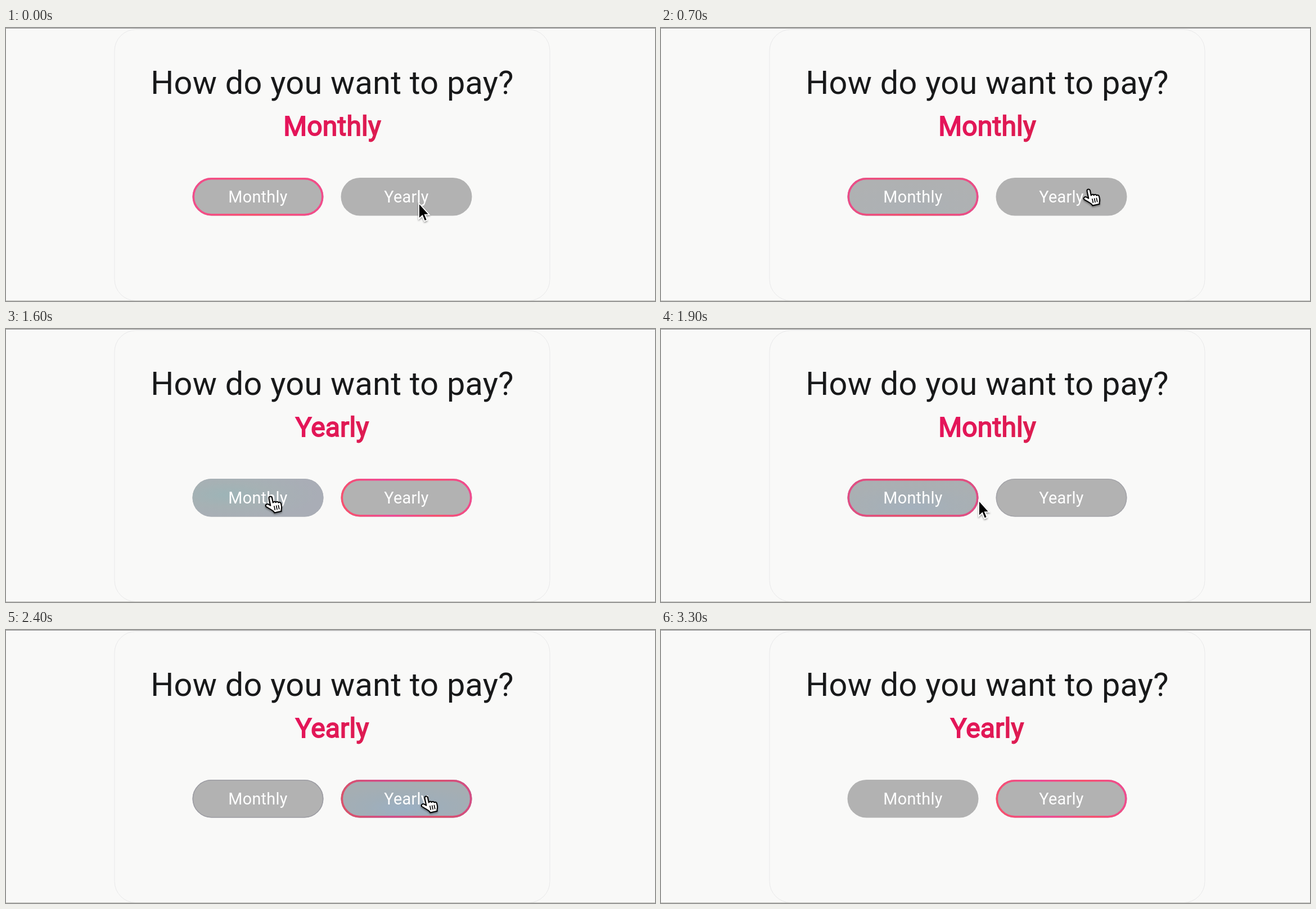
Animation of 1154x485 px, one loop 3.4 s. Source, as an HTML page:

```html
<!DOCTYPE html>
<html lang="en">
<head>
<meta charset="utf-8">
<title>Payment choice</title>
<style>
  html, body { margin: 0; width: 100%; height: 100%; overflow: hidden; background: #f9f9f8; }
  svg { display: block; width: 100vw; height: 100vh; }
  text { font-family: Roboto, sans-serif; text-anchor: middle; }
  .title { font-size: 57.6px; letter-spacing: .26px; fill: #18191a; }
  .choice { font-size: 48px; letter-spacing: .2px; fill: url(#ink); stroke: url(#ink); stroke-width: 1.8; }
  .label { font-size: 28.8px; letter-spacing: .3px; fill: #fff; }
</style>
</head>
<body>
<svg viewBox="0 0 1154 485">
  <defs>
    <linearGradient id="ink" gradientUnits="userSpaceOnUse" x1="490" y1="150" x2="670" y2="200">
      <stop stop-color="#e6135b"/><stop offset="1" stop-color="#dc1d50"/>
    </linearGradient>
    <linearGradient id="ring0" gradientUnits="userSpaceOnUse" spreadMethod="reflect" x1="332" y1="290" x2="444" y2="310">
      <stop stop-color="#f24c8c"/><stop offset="1" stop-color="#fa5070"/>
    </linearGradient>
    <linearGradient id="ring1" gradientUnits="userSpaceOnUse" spreadMethod="reflect" x1="600" y1="308" x2="676" y2="288">
      <stop stop-color="#f8506f"/><stop offset="1" stop-color="#ee4a95"/>
    </linearGradient>
    <radialGradient id="press" cx=".26" cy=".42" r=".7">
      <stop stop-color="#9db4b7"/><stop offset=".45" stop-color="#a6b1b4"/><stop offset="1" stop-color="#a9adb6"/>
    </radialGradient>
    <radialGradient id="spread" cx=".5" cy=".75" r=".6">
      <stop stop-color="#9bb0c4"/><stop offset=".5" stop-color="#a0aeb8"/><stop offset="1" stop-color="#a5aeb3"/>
    </radialGradient>
    <filter id="shadow" x="-50%" y="-50%" width="200%" height="200%">
      <feDropShadow dx="0" dy="2" stdDeviation="1.5" flood-opacity=".4"/>
    </filter>
  </defs>
  <rect width="1154" height="485" fill="#f9f9f8"/>
  <rect x="193" y="2.5" width="774" height="482" rx="38" fill="none" stroke="#e9e9ea"/>
  <path d="M0 .5H1154" stroke="#929292"/>
  <path d="M0 484.5H1154" stroke="#bdbdb8"/>
  <text class="title" x="580" y="116.5">How do you want to pay?</text>
  <text class="choice" id="choice" x="580" y="190.5"></text>
  <g id="buttons"></g>
  <g id="cursor" filter="url(#shadow)">
    <path id="arrow" d="M0 0V28L6.3 22.3 10.2 32 14.8 30.2 10.9 20.6H18.6Z" fill="#000" stroke="#fff" stroke-width="1.8"/>
    <g id="hand" transform="rotate(-12)" stroke="#000" stroke-linejoin="round" stroke-linecap="round">
      <path d="M0 3C0-.8 5.4-.8 5.4 3V12C6.4 10 10 10 10.2 12.5 11.7 11 14.8 11.5 14.8 14 16.5 13 19 14 19 16.5V21C19 25 16.8 26 16.8 30H4.2C4 26-1.5 22.5-8 16.5-10 13-5.8 11.2-3.4 13L0 16Z" fill="#fff" stroke-width="2"/>
      <path d="M6.2 18.5V25M10 18.5V25M13.8 18.5V25" fill="none" stroke-width="1.6"/>
    </g>
  </g>
</svg>
<script>
const LOOP = 3400, STEP = 100, FLIP = 100;
const byId = id => document.getElementById(id);
const names = ["Monthly", "Yearly"];
const clicks = [{ at: 300, pick: 0 }, { at: 900, pick: 1 }, { at: 1600, pick: 0 }, { at: 2200, pick: 1 }];

// time, x, y of the pointer tip
const path = [
  [0, 734, 311], [100, 690, 306], [200, 570, 300], [300, 468, 298], [400, 470, 298],
  [500, 520, 295], [600, 650, 289], [700, 757, 287], [800, 768, 290], [900, 758, 292],
  [1000, 700, 293], [1100, 592, 293], [1200, 510, 296], [1300, 470, 298], [1600, 467, 298],
  [1700, 470, 299], [1800, 500, 302], [2000, 630, 307], [2100, 690, 308], [2200, 705, 306],
  [2300, 720, 302], [2400, 744, 296], [2500, 755, 308], [2700, 780, 385], [2900, 795, 470], [3000, 798, 520]
];

const buttons = names.map((name, i) => {
  const x = i ? 595.5 : 331.5;
  const pill = (inset, attrs) => `<rect x="${x + inset}" y="${266 + inset}" width="${233 - 2 * inset}"
    height="${67.5 - 2 * inset}" rx="${33.75 - inset}" ${attrs}/>`;
  const group = document.createElementNS("http://www.w3.org/2000/svg", "g");
  group.innerHTML =
    pill(0, 'fill="#b2b2b2"') +
    pill(0, 'class="press" fill="url(#press)"') +
    pill(0, 'class="spread" fill="url(#spread)"') +
    pill(.8, 'class="fade" fill="none" stroke="#9d9da4" stroke-width="1.6"') +
    pill(1.8, `class="ring" fill="none" stroke="url(#ring${i})" stroke-width="3.6"`) +
    pill(1.8, 'class="dim" fill="none" stroke="#555" stroke-width="3.6"') +
    `<text class="label" x="${x + 116.5}" y="309.5">${name}</text>`;
  byId("buttons").append(group);
  const show = (part, value) => group.querySelector("." + part).setAttribute("opacity", value);
  return { x, show };
});

const clamp = v => Math.max(0, Math.min(1, v));

function pointerAt(t) {
  const i = path.findIndex(p => p[0] > t);
  if (i < 0) return path[path.length - 1].slice(1);
  const [t0, x0, y0] = path[i - 1], [t1, x1, y1] = path[i];
  const k = (t - t0) / (t1 - t0);
  return [x0 + (x1 - x0) * k, y0 + (y1 - y0) * k];
}

function ripple(click, t) {
  if (!click) return { press: 0, spread: 0 };
  const age = t - click.at;
  return {
    press: clamp(1 - age / 200),
    spread: age <= 200 ? age / 200 : clamp(1 - (age - 200) / 260)
  };
}

function draw(t) {
  const picked = clicks.reduce((now, c) => t >= c.at + FLIP ? c.pick : now, 0);
  byId("choice").textContent = names[picked];

  buttons.forEach((b, i) => {
    const last = pick => clicks.filter(c => c.pick === pick && c.at <= t).pop();
    const own = last(i), other = last(1 - i);
    const wave = ripple(own, t);
    const selected = i === picked;
    b.show("press", wave.press);
    b.show("spread", wave.spread);
    b.show("fade", own && !selected ? ripple(other, t).spread : 0);
    b.show("ring", selected ? 1 : 0);
    b.show("dim", selected ? .18 * wave.spread : 0);
  });

  const [x, y] = pointerAt(t);
  const over = y > 266 && y < 334 && buttons.some(b => x > b.x - 5 && x < b.x + 233);
  const hand = over && t > 0;
  byId("cursor").setAttribute("transform", `translate(${x} ${y})`);
  byId("cursor").style.display = t >= 3000 ? "none" : "";
  byId("hand").style.display = hand ? "" : "none";
  byId("arrow").style.display = hand ? "none" : "";
}

const start = performance.now();
function tick() {
  const t = (performance.now() - start) % LOOP;
  draw(Math.floor(t / STEP) * STEP);
  requestAnimationFrame(tick);
}
tick();
</script>
</body>
</html>
```
